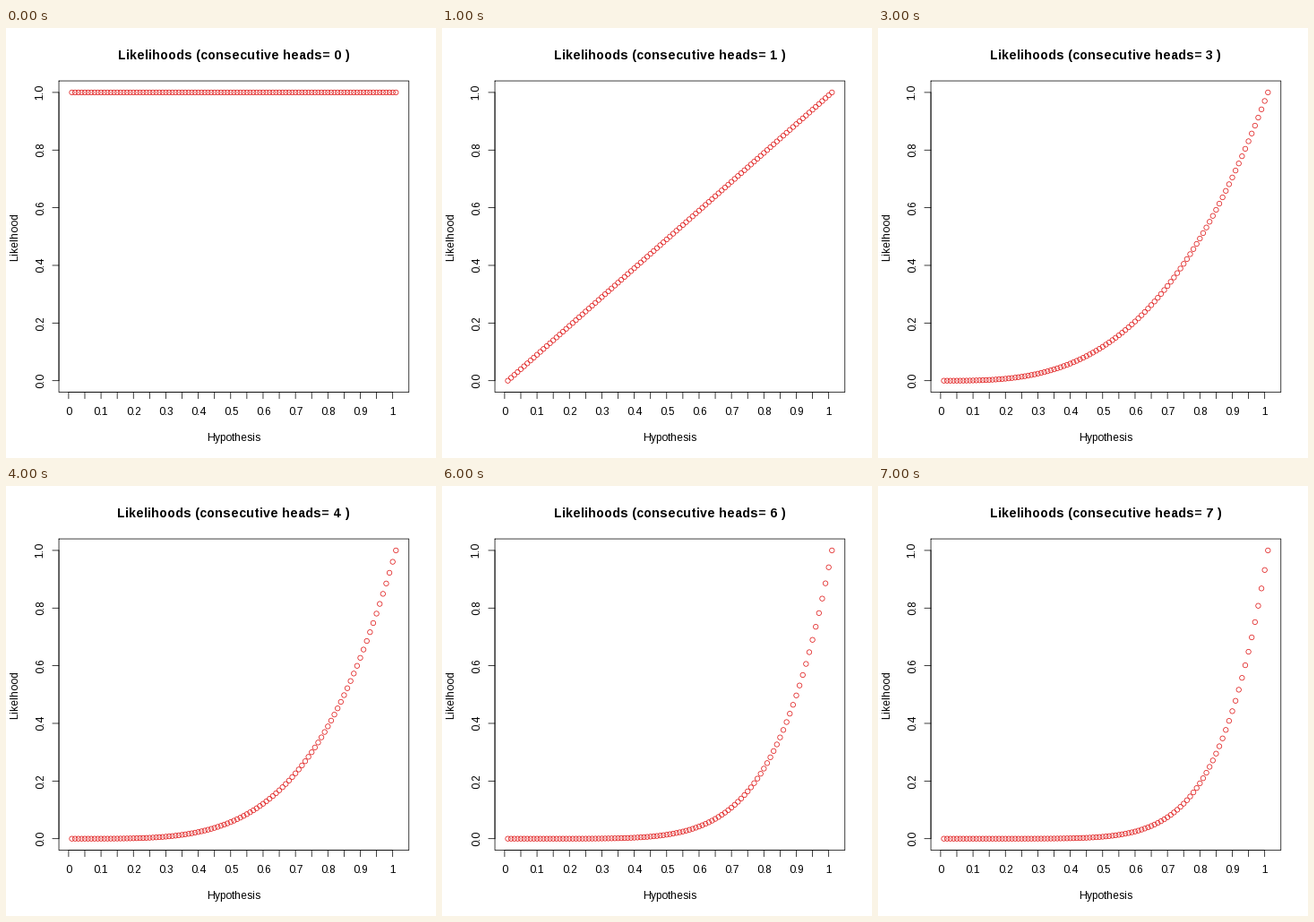
A matplotlib script for the animation above (8000 ms loop, 480x480 px).

```python
import numpy as np
import matplotlib as mpl
import matplotlib.pyplot as plt
from matplotlib.animation import FuncAnimation
from matplotlib.collections import EllipseCollection

mpl.rcParams.update({
    "font.family": "Liberation Sans",
    "text.hinting": "force_autohint",
    "text.hinting_factor": 1,
    "toolbar": "None",
})

SIZE = 480
LEFT, RIGHT, TOP, BOTTOM = 59.04, 449.76, 59.04, 406.56
MID_X, MID_Y = (LEFT + RIGHT) / 2, (TOP + BOTTOM) / 2
TICK = 7.2
STROKE = 0.75
STEPS = 8


def to_x(index):
    return LEFT + (RIGHT - LEFT) * (index + 3) / 108


def to_y(value):
    return BOTTOM - (BOTTOM - TOP) * (value + 0.04) / 1.08


fig = plt.figure(figsize=(SIZE / 72, SIZE / 72), dpi=72, facecolor="white")
ax = fig.add_axes([0, 0, 1, 1])
ax.set_xlim(0, SIZE)
ax.set_ylim(SIZE, 0)
ax.axis("off")


def line(xs, ys):
    ax.plot(xs, ys, color="black", lw=STROKE, snap=False,
            solid_capstyle="round", solid_joinstyle="round")


def label(x, y, text, size=12, **style):
    return ax.text(x, y, text, fontsize=size, ha="center", va="baseline",
                   rotation_mode="anchor", **style)


# Box, then axis lines over its left and bottom edges
line([LEFT, RIGHT, RIGHT, LEFT, LEFT], [TOP, TOP, BOTTOM, BOTTOM, TOP])
line([to_x(0), to_x(100)], [BOTTOM, BOTTOM])
line([LEFT, LEFT], [to_y(0), to_y(1)])

for i in range(0, 101, 5):
    line([to_x(i)] * 2, [BOTTOM, BOTTOM + TICK])
    if i % 10 == 0:
        label(to_x(i), 432.48, f"{i / 100:g}")
for i in range(6):
    y = to_y(i / 5)
    line([LEFT - TICK, LEFT], [y, y])
    label(41.76, y, f"{i / 5:.1f}", rotation=90)

label(MID_X, 461.28, "Hypothesis")
label(12.96, MID_Y, "Likelhood", rotation=90)
title = label(MID_X, 34.7, "", 14.4, weight="bold")

# One ring per hypothesis
index = np.arange(1, 102)
chance = (index - 1) / 100
rings = EllipseCollection(
    5.4, 5.4, 0, units="xy", offsets=np.column_stack([to_x(index), index]),
    offset_transform=ax.transData, facecolors="none", edgecolors="#e01a1a",
    linewidths=STROKE)
ax.add_collection(rings)


def draw(heads):
    title.set_text(f"Likelihoods (consecutive heads= {heads} )")
    rings.set_offsets(np.column_stack([to_x(index), to_y(chance ** heads)]))
    return title, rings


anim = FuncAnimation(fig, draw, frames=STEPS, interval=1000, repeat=True,
                     repeat_delay=0, blit=False)
plt.show()
```
